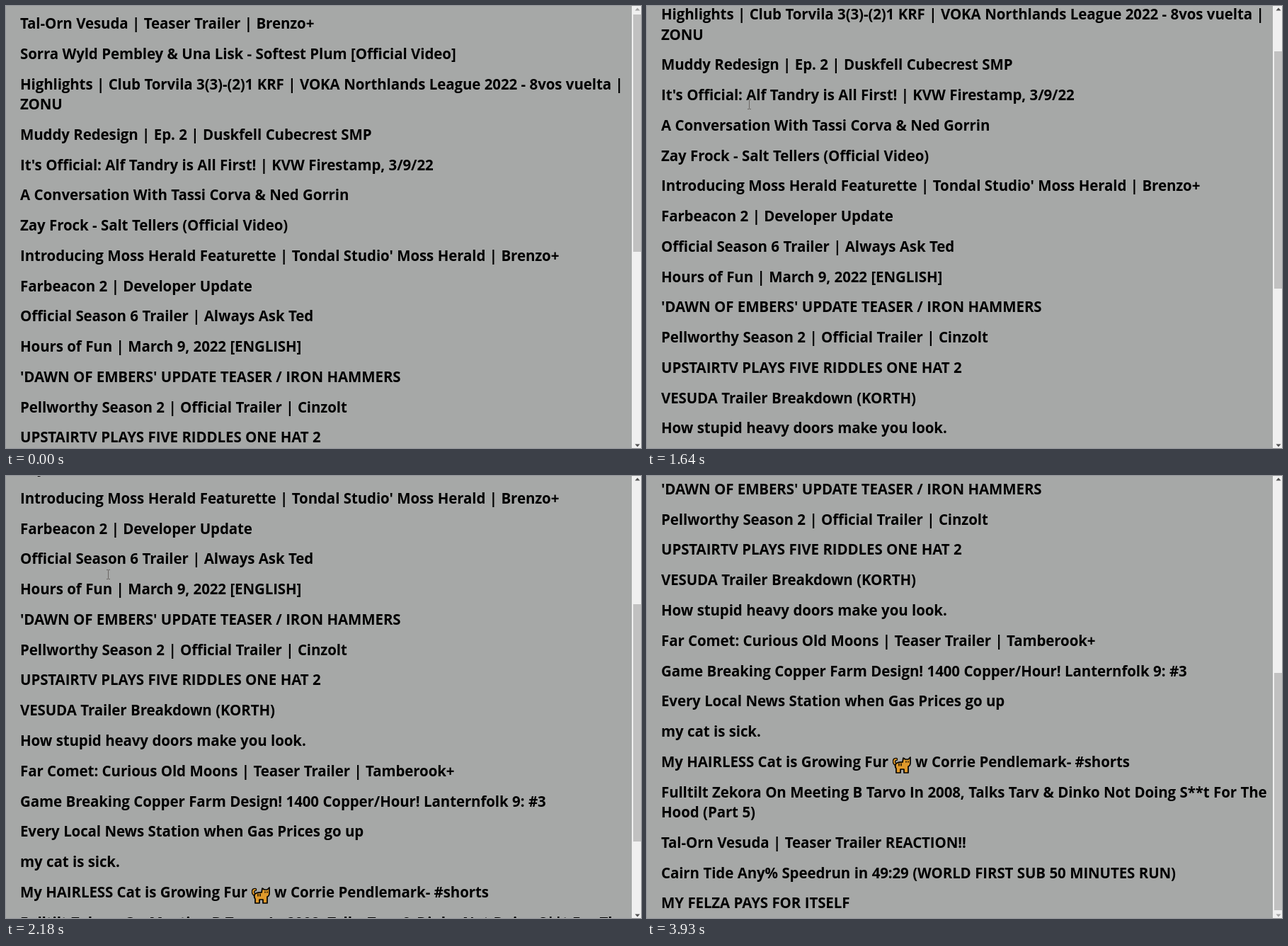
An HTML page for the animation above (4.99 s loop, 897x624 px).

```html
<!DOCTYPE html>
<html lang="en">
<head>
<meta charset="utf-8">
<title>Trending titles</title>
<style>
html, body { margin: 0; width: 100%; height: 100%; overflow: hidden; background: #a6a8a7; }
#stage { position: relative; width: 100%; height: 100%; overflow: hidden; contain: strict; }
#list {
  position: absolute; left: 20px; top: 10px; white-space: nowrap; color: #000;
  font: 700 20.5px/28.5px "Open Sans", "Noto Sans", sans-serif;
  letter-spacing: -.12px; word-spacing: .3px;
}
p { margin: 0 0 14.27px; }
.cat { width: 27px; height: 26px; margin: -4px 0; vertical-align: -6px; }
#ui { position: absolute; left: 0; top: 0; }
</style>
</head>
<body>
<div id="stage">
<div id="list">
<p>Tal-Orn Vesuda | Teaser Trailer | Brenzo+</p>
<p>Sorra Wyld Pembley &amp; Una Lisk - Softest Plum [Official Video]</p>
<p>Highlights | Club Torvila 3(3)-(2)1 KRF | VOKA Northlands League 2022 - 8vos vuelta |<br>ZONU</p>
<p>Muddy Redesign | Ep. 2 | Duskfell Cubecrest SMP</p>
<p>It's Official: Alf Tandry is All First! | KVW Firestamp, 3/9/22</p>
<p>A Conversation With Tassi Corva &amp; Ned Gorrin</p>
<p>Zay Frock - Salt Tellers (Official Video)</p>
<p>Introducing Moss Herald Featurette | Tondal Studio' Moss Herald | Brenzo+</p>
<p>Farbeacon 2 | Developer Update</p>
<p>Official Season 6 Trailer | Always Ask Ted</p>
<p>Hours of Fun | March 9, 2022 [ENGLISH]</p>
<p>'DAWN OF EMBERS' UPDATE TEASER / IRON HAMMERS</p>
<p>Pellworthy Season 2 | Official Trailer | Cinzolt</p>
<p>UPSTAIRTV PLAYS FIVE RIDDLES ONE HAT 2</p>
<p>VESUDA Trailer Breakdown (KORTH)</p>
<p>How stupid heavy doors make you look.</p>
<p>Far Comet: Curious Old Moons | Teaser Trailer | Tamberook+</p>
<p>Game Breaking Copper Farm Design! 1400 Copper/Hour! Lanternfolk 9: #3</p>
<p>Every Local News Station when Gas Prices go up</p>
<p>my cat is sick.</p>
<p>My HAIRLESS Cat is Growing Fur <svg class="cat" viewBox="0 0 27 26"><g stroke="#000" stroke-linejoin="round" stroke-linecap="round"><path d="M7 13Q2 12 2 8Q2 5 5 5" fill="none" stroke-width="4.5"/><path d="M7 13Q2 12 2 8Q2 5 5 5" fill="none" stroke="#e09a2b" stroke-width="2"/><path d="M4 12Q7 8 14 9L15 3L18 5H22L25 2V10Q25 14 22 15V24H16V19H11V24H5V18Q3 16 4 12Z" fill="#e09a2b" stroke-width="1.7"/><path d="M9 11v3M12 11v3M19 8v1M22 8v1" stroke-width="1.4"/></g></svg> w Corrie Pendlemark- #shorts</p>
<p>Fulltilt Zekora On Meeting B Tarvo In 2008, Talks Tarv &amp; Dinko Not Doing S**t For The<br>Hood (Part 5)</p>
<p>Tal-Orn Vesuda | Teaser Trailer REACTION!!</p>
<p>Cairn Tide Any% Speedrun in 49:29 (WORLD FIRST SUB 50 MINUTES RUN)</p>
<p>MY FELZA PAYS FOR ITSELF</p>
</div>
<svg id="ui" width="897" height="624">
  <path d="M884 0h13v624h-13z" fill="#f0f0f0"/>
  <path id="thumb" d="M886 0h11v335h-11z" fill="#c1c1c1"/>
  <path id="up" d="M888.5 6.5h7l-3.5-4z"/>
  <path id="down" d="M888.5 618.5h7l-3.5 4z"/>
  <g id="cursor">
    <path id="arrow" d="M.5.5V13l3-2.7 2 4.7 2-.9-2-4.5h4z" fill="#fff" stroke="#000"/>
    <path id="beam" d="M-2.5-6.5h2l.5 1 .5-1h2M0-5.5v11M-2.5 6.5h2l.5-1 .5 1h2" fill="none" stroke="#6a6764"/>
  </g>
</svg>
</div>
<script>
const LOOP = 4990, END = 505, SLACK = 8;
const el = id => document.getElementById(id);
const show = (id, on) => el(id).setAttribute("visibility", on ? "visible" : "hidden");
const move = (id, x, y) => el(id).setAttribute("transform", `translate(${x} ${y})`);

// Two wheel gestures; offsets are spread evenly over start..end
const scrolls = [
  { start: 1510, end: 1920, at: [12, 50, 98.5, 152, 242.5, 282, 296] },
  { start: 2180, end: 2450, at: [321, 385, 441, 480, END] }
];

// Pointer legs; beam is the x range in which the text cursor shows
const legs = [
  { start: 650, end: 1110, n: 8, from: [3, 612], to: [86, 164], pow: .7, beam: [20, 897] },
  { start: 1180, end: 1310, n: 3, from: [104, 154], to: [142, 138], pow: 1 },
  { start: 1510, end: 1920, n: 2, from: [145, 139], to: [145, 139], pow: 1, beam: [0, 897] },
  { start: 2930, end: 3330, n: 7, from: [145, 140], to: [386, 602], pow: 1.2, beam: [0, 300], hide: 3390 },
  { start: 3530, end: 3860, n: 6, from: [544, 542], to: [716, 612], pow: 1, hide: 3930 }
];

const latest = (list, t) => list.filter(s => t + SLACK >= s.start).pop();
const step = (t, s, n) =>
  Math.min(n - 1, Math.floor((t + SLACK - s.start) / (s.end - s.start) * (n - 1)));

function drawScroll(t) {
  const s = latest(scrolls, t);
  const y = s ? s.at[step(t, s, s.at.length)] : 0;
  el("list").style.top = 10 - y + "px";
  move("thumb", 0, Math.round(12 + y / 1.898));
  el("up").setAttribute("fill", y > 0 ? "#505050" : "#a3a3a3");
  el("down").setAttribute("fill", y < END ? "#505050" : "#a3a3a3");
}

function drawPointer(t) {
  const leg = latest(legs, t);
  const on = leg && !(t + SLACK >= leg.hide);
  let beam = false;
  if (on) {
    const k = (step(t, leg, leg.n) / (leg.n - 1)) ** leg.pow;
    const [x, y] = leg.from.map((a, i) => Math.round(a + (leg.to[i] - a) * k));
    beam = !!leg.beam && x >= leg.beam[0] && x < leg.beam[1];
    move("cursor", beam ? x - .5 : x, y);
  }
  show("arrow", on && !beam);
  show("beam", beam);
}

function frame() {
  const t = performance.now() % LOOP;
  drawScroll(t);
  drawPointer(t);
  requestAnimationFrame(frame);
}
frame();
</script>
</body>
</html>
```
